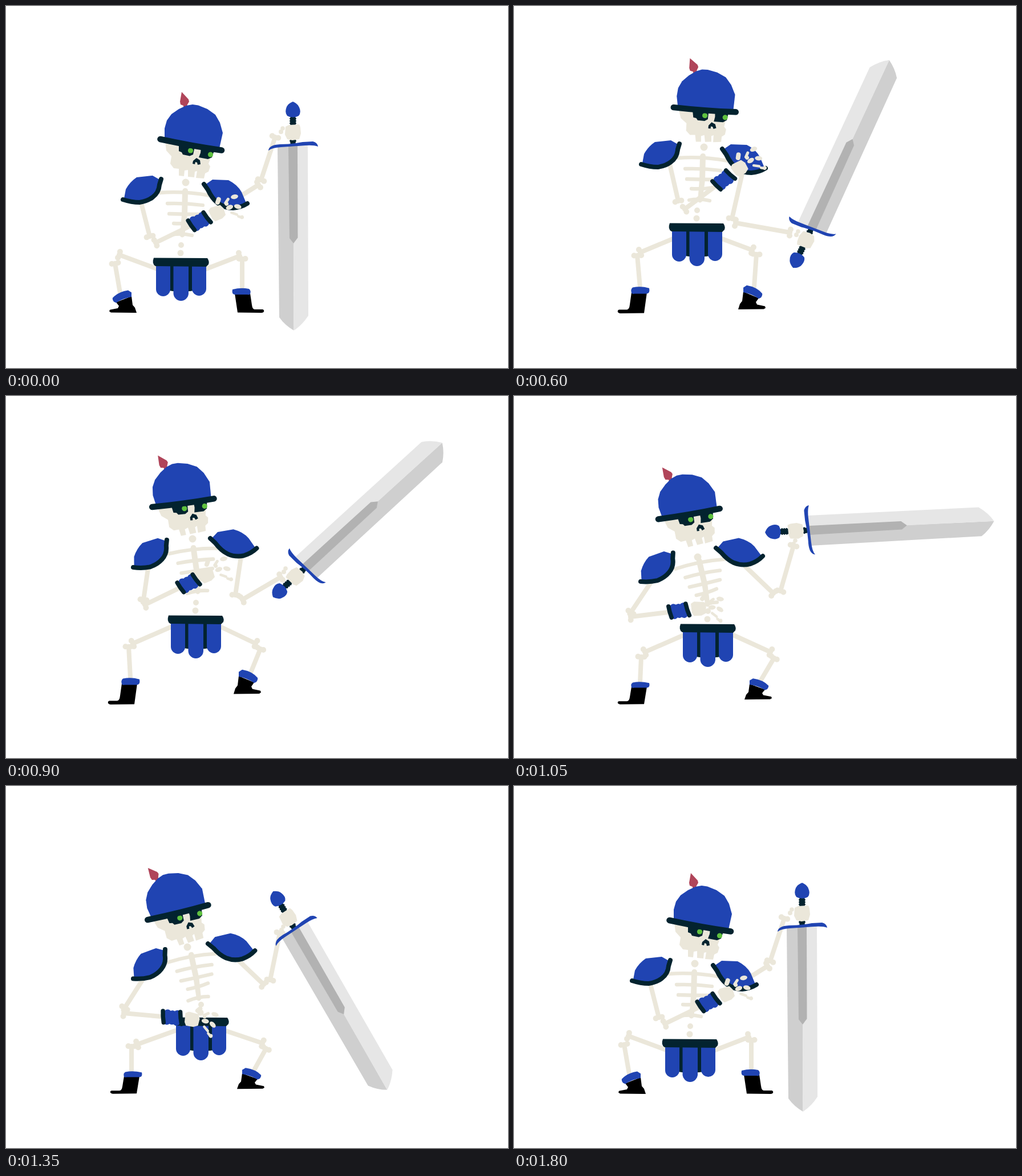
An HTML page for the animation above (1.95 s loop, 880 by 636 pixels).

```html
<!DOCTYPE html>
<html lang="en">
<head>
<meta charset="utf-8">
<title>Skeleton guard</title>
<style>
  html, body { margin: 0; width: 100%; height: 100%; overflow: hidden; background: #fff; }
  svg { display: block; width: 100%; height: 100%; }
</style>
</head>
<body>
<svg id="stage" viewBox="0 0 880 636"></svg>
<script>
const STEP = 150;
const BONE = '#ebe7da', BLUE = '#2044b2', DARK = '#03232f', RED = '#b0455a', GREEN = '#5fc13f';

// Joints are [x, y], placed parts [x, y, angle], bones [x1, y1, x2, y2], boots [x, y, facing, height].
const rest = {
  head: [324, 243.5, 0], neck: [315, 310], chest: [314, 322, 0],
  padL: [205, 340, 0], padR: [347, 313, 0], skirt: [257, 443],
  armL: [236, 342, 252, 405], foreL: [262, 416, -26],
  armR: [405, 338, 443, 314], foreR: [447, 306, 472, 230],
  knuckle: [483, 218], sword: [503, 222, 0],
  thighL: [268, 463, 198, 437], shinL: [191, 452, 200, 504],
  thighR: [348, 463, 410, 439], shinR: [414, 444, 414, 498],
  boot: [412, 502, 1, 1], heel: [204, 510, -1, .95]
};
const rise = {
  head: [334, 182, -6], neck: [333, 248], chest: [331, 261, 0],
  padL: [223, 278, 0], padR: [365, 251, 0], skirt: [271, 382],
  armL: [273, 278, 288, 343], foreL: [299, 357, -36.8],
  armR: [402, 286, 382, 374], foreR: [388, 381, 484, 398],
  knuckle: [496, 399], sword: [512, 411, -155],
  thighL: [281, 408, 221, 433], shinL: [216, 438, 221, 495],
  thighR: [362, 408, 418, 429], shinR: [425, 436, 421, 493],
  boot: [222, 500, -1, 1.08], heel: [418, 502, 1, 1.02]
};
const aim = {
  head: [310, 187.5, -18], neck: [327, 251], chest: [328, 264, -9.5],
  padL: [223, 301, -11], padR: [358, 250, -12], skirt: [283, 386],
  armL: [249, 303, 241, 358], foreL: [243, 367, -26],
  armR: [412, 282, 402, 350], foreR: [414, 358, 482, 318],
  knuckle: [488, 306], sword: [508, 317, -132.2],
  thighL: [293, 404, 222, 435], shinL: [215, 440, 218, 495],
  thighR: [373, 404, 438, 435], shinR: [446, 444, 429, 486],
  boot: [219, 502, -1, 1.08], heel: [424, 492, 1, 1.03]
};
const thrust = {
  head: [306.5, 207, -20], neck: [322, 283], chest: [324, 287, -14.5],
  padL: [222, 326, -13.4], padR: [354, 267, -14.3], skirt: [290, 401],
  armL: [241, 326, 205, 380], foreL: [204, 388, -7],
  armR: [406, 300, 455, 347], foreR: [467, 343, 490, 263],
  knuckle: [491, 257], sword: [494, 237, -92.6],
  thighL: [300, 419, 229, 450], shinL: [223, 458, 221, 503],
  thighR: [380, 418, 450, 450], shinR: [456, 460, 433, 499],
  boot: [222, 508, -1, .91], heel: [429, 506, 1, .89]
};
const lower = {
  head: [301, 222, -24], neck: [318, 283], chest: [324, 294, -13.5],
  padL: [223, 338.5, -14.4], padR: [354, 277, -15.7], skirt: [292, 407],
  armL: [241, 338, 208, 390], foreL: [206, 399, 5.2],
  armR: [407, 306, 452, 349], foreR: [463, 341, 480, 258],
  knuckle: [484, 250], sword: [495, 232, -29.6],
  thighL: [302, 428, 230, 454], shinL: [220, 457, 220, 503],
  thighR: [382, 429, 450, 452], shinR: [456, 461, 435, 499],
  boot: [223, 507, -1, .91], heel: [430, 505, 1, .89]
};

function blend(a, b, t, extra) {
  const pose = {};
  for (const k in a) pose[k] = a[k].map((v, i) => v + (b[k][i] - v) * t);
  return Object.assign(pose, extra);
}
const lunge = blend(rise, aim, .55, {
  armR: [408, 284, 400, 362], foreR: [412, 369, 511, 353],
  knuckle: [520, 346], sword: [536, 357, -136]
});
const swing = blend(thrust, lower, .6, { sword: [494, 232, -51] });

const timeline = [
  [rest, 0, 0], [rest, -1, -1], [rest, 2, -1], [rest, 3, 1],
  [rise, 0, 0], [lunge, 0, 0], [aim, 0, 0], [thrust, 0, 0], [swing, 0, 0], [lower, 0, 0],
  [rest, 0, 0], [rest, -1, 1], [rest, 2, 2]
];

const fill = (d, c) => `<path d="${d}" fill="${c}"/>`;
const line = (d, c, w) =>
  `<path d="${d}" fill="none" stroke="${c}" stroke-width="${w}" stroke-linecap="round" stroke-linejoin="round"/>`;
const dot = (x, y, r, c = BONE) => `<circle cx="${x}" cy="${y}" r="${r}" fill="${c}"/>`;
const oval = (x, y, rx, ry, a = 0, c = BONE) =>
  `<ellipse cx="${x}" cy="${y}" rx="${rx}" ry="${ry}" fill="${c}" transform="rotate(${a} ${x} ${y})"/>`;
const place = ([x, y, a = 0], [px, py], body) =>
  `<g transform="translate(${x} ${y}) rotate(${a}) translate(${-px} ${-py})">${body}</g>`;
const face = ([x, y, sx, sy], body) =>
  `<g transform="translate(${x} ${y}) scale(${sx} ${sy})">${body}</g>`;

// A bone with a pair of knobs at its start and/or end.
function bone([x1, y1, x2, y2], start, end) {
  const len = Math.hypot(x2 - x1, y2 - y1);
  const nx = (y1 - y2) / len * 5.5, ny = (x2 - x1) / len * 5.5;
  const knobs = (x, y) => dot(x + nx, y + ny, 5) + dot(x - nx, y - ny, 5);
  return line(`M${x1},${y1}L${x2},${y2}`, BONE, 8) +
    (start ? knobs(x1, y1) : '') + (end ? knobs(x2, y2) : '');
}

const head =
  fill('M279,238L281,254L290,264L288,277L294,285L303,286L303,298L312,299L313,289L319,288L319,300L330,301L331,291L335,290L333,302L347,303L349,294L355,291L358,282L355,277L358,269L361,250Z', BONE) +
  fill('M303,242L331,247L328,261L322,263.500L310,261L308,257L303,255Z', DARK) +
  fill('M342,249L365,254L361,266L354,269L338,266L341,258Z', DARK) +
  dot(323.5, 254, 4.6, GREEN) + dot(358.5, 261, 4.6, GREEN) +
  fill('M327,277L328,272L334,267L340,271L341,278L336,279L335,275L332,274L331,278Z', DARK) +
  fill('M308,151L320,164L321,168L317.500,174L319,180L311,180L311,175L306,173L305,168Z', RED) +
  fill('M278,236L278,215L282,201L290,190L303,181L316,175L327,173L337,174.500L353,181L367,191L375,205L380,223L374,250Z', BLUE) +
  line('M270.500,234Q325,246 378,253.500', DARK, 10.5);

const chest =
  fill('M-5,3Q-4,-2 0,-2Q5,-2 5,3L4,45L-1,82Q-5,87 -9,82L-6,45Z', BONE) +
  line('M-44,6Q0,3 43,11M-31,25Q0,24 31,28M-28,43Q0,44 27,44M-20,60Q0,61 17,58M-24,80Q-6,77 12,81', BONE, 6.3);

const padL =
  fill('M207,338L210,322Q217,309 229,301L257,298L271,306L268,325L255,340L230,346Z', BLUE) +
  line('M205,340Q220,345 234,345Q248,343 257,336Q268,328 269,314L272,304', DARK, 8);

const padR =
  fill('M349,314L362,305L390,306Q406,314 413,327L421,346L397,355L374,347Z', BLUE) +
  line('M347,313L354,323Q361,338 371,346Q383,355 398,355Q412,354 423,347', DARK, 8);

const flap = (x, w, end) =>
  fill(`M${x},455H${x + w}V${end - w / 2}a${w / 2},${w / 2} 0 0 1 ${-w},0Z`, BLUE);
const skirt =
  dot(307, 420, 5) + dot(306, 434, 5.5) +
  fill('M280,455H335V499Q308,505 280,499Z', DARK) +
  flap(263, 25, 510) + flap(293.5, 26.5, 518) + flap(326, 25, 509) +
  fill('M259,442.500L353,443Q357,449 355,454L351,458L262,457Q255,453 259,442.500Z', DARK);

const forearm =
  bone([0, 0, 66, 0], true, false) +
  oval(77, 0, 9, 13.5, 0, BLUE) + oval(85.5, 0, 9, 12.5, 0, BLUE) + oval(94, 0, 9, 13.5, 0, BLUE) +
  line('M68.500,-10Q69,0 71.500,10M99,-11Q100,0 103,10', DARK, 7.5) +
  fill('M108,-10L114,-13L131,-10L134,-2L132,10L124,13L111,12L108,6Z', BONE) +
  line('M129,-16L133,-20', BONE, 8) +
  line('M141,-9L148,-13', BONE, 5) + dot(142, -7, 3.5) +
  oval(160, -12, 6.5, 4, 15) + oval(144, 1, 6.5, 4, 5) + oval(157.5, 6, 6.5, 4, 40) +
  line('M143,11L150,18M151,22L156,27', BONE, 4.5) + dot(156, 26, 3.4);

const sword =
  line('M503,197V240', DARK, 9.5) +
  [198, 202, 206, 237].map(y => oval(503, y, 6, 2.6, 0, DARK)).join('') +
  fill('M503,168Q512,172 514,178Q518,187 513,193Q503,198 493,193Q488,187 492,177Q495,171 503,168Z', BLUE) +
  fill('M476,246H504L504.500,570Q489,561 479,547Z', '#cfcfcf') +
  fill('M503.500,245H529L530,544Q519,561 504.500,570Z', '#e6e6e6') +
  fill('M495,246H511L511.500,407L504,417L497,408Z', '#b2b2b2') +
  fill('M460,254Q461,244 480,243Q500,243 520,239L538,238Q546,240 547,247Q540,244 525,245L482,248Q466,249 460,254Z', BLUE) +
  fill('M490,212L496,209L514,208L516,213L517,224L514,234L502,236L493,234L489,226Z', BONE);

const boot =
  fill('M-11,3L16,3L19,23Q20,31 24,31L38,31Q41,32 40,35Q39,37 36,37L-6,36.500Z', '#000') +
  fill('M-15,-4Q0,-8 14,-5Q18,-2 16,4Q15,6 11,5L-10,5Q-17,5 -15,-4Z', BLUE);
const heel =
  fill('M-16,0L11,11L6,18L8,22L22,25L23,28L20,30L-25,30.500L-22,21L-18,16Z', '#000') +
  fill('M-16,-7L-10,-11Q8,-8 17,3Q18,6 15,10L11,12Q0,4 -16,1Z', BLUE);

function draw(p) {
  const [kx, ky] = p.knuckle;
  return bone(p.thighL, false, true) + bone(p.shinL, true, false) +
    bone(p.thighR, false, true) + bone(p.shinR, true, false) +
    face(p.boot, boot) + face(p.heel, heel) +
    dot(...p.neck, 6.5) + place(p.chest, [0, 0], chest) +
    place(p.skirt, [257, 443], skirt) +
    bone(p.armL, false, true) + bone(p.armR, false, true) +
    place(p.padL, [205, 340], padL) + place(p.padR, [347, 313], padR) +
    place(p.head, [324, 243.5], head) +
    bone(p.foreR, true, true) +
    dot(kx + 2, ky - 3, 3.8) + dot(kx - 1, ky + 3, 4) +
    place(p.sword, [503, 222], sword) +
    place(p.foreL, [0, 0], forearm);
}

const stage = document.getElementById('stage');
let shown = -1;
function render(now) {
  const i = Math.floor(now / STEP) % timeline.length;
  if (i !== shown) {
    const [pose, dx, dy] = timeline[i];
    stage.innerHTML = `<g transform="translate(${dx} ${dy})">${draw(pose)}</g>`;
    shown = i;
  }
}

let begin;
function tick(now) {
  begin ??= now;
  render(Math.max(0, now - begin));
  requestAnimationFrame(tick);
}
render(0);
requestAnimationFrame(tick);
</script>
</body>
</html>
```
